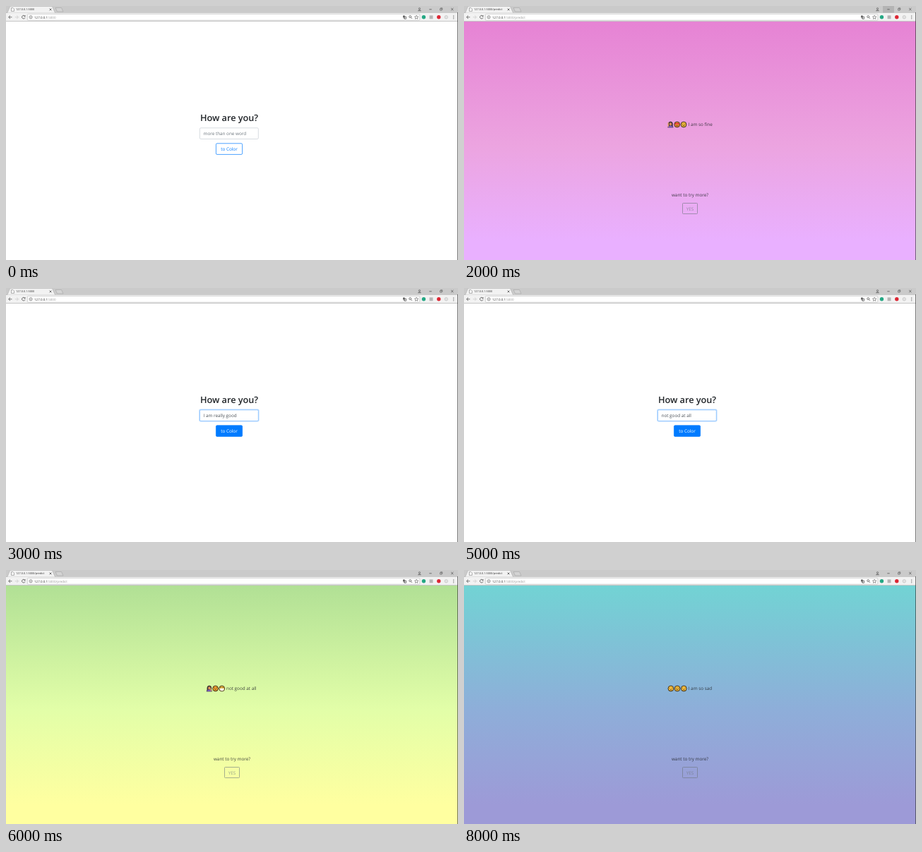
Recreate the animation shown at these times as an HTML page. Size 640 by 360 pixels, loop 9000 ms.

```html
<!DOCTYPE html>
<html lang="en">
<head>
<meta charset="utf-8">
<title>Mood to color</title>
<style>
  html, body { margin: 0; width: 100%; height: 100%; overflow: hidden; background: #fff; }
  svg { display: block; width: 100vw; height: 100vh; }
  text { font-family: "Open Sans", "Noto Sans", sans-serif; font-size: 6.35px; text-rendering: geometricPrecision; white-space: pre; }
  .line { fill: none; stroke: #555; stroke-width: .8; }
  .mid { text-anchor: middle; }
  .ink { fill: #212529; }
  .face { fill: #fdc23c; stroke: #29231f; stroke-width: .9; }
  .mark { fill: none; stroke: #3a2a18; stroke-width: .8; stroke-linecap: round; }
</style>
</head>
<body>
<svg viewBox="0 0 640 360" preserveAspectRatio="none">
  <defs>
    <linearGradient id="sky" x1="0" y1="0" x2="0" y2="1">
      <stop offset="0"/><stop offset=".52"/><stop offset=".92"/>
    </linearGradient>
  </defs>

  <rect width="640" height="360" fill="#fff"/>

  <g id="form">
    <text class="mid ink" x="316" y="163.3" style="font-size:12.7px;font-weight:600">How are you?</text>
    <rect id="glow" x="273.2" y="171.6" width="85.3" height="18" rx="2" fill="#bfdeff"/>
    <rect id="field" x="274.4" y="172.8" width="82.9" height="15.7" rx="1.5" fill="#fff" stroke-width=".8"/>
    <text id="entry" x="279.5" y="183.2"></text>
    <rect id="send" x="297.4" y="194.8" width="37.2" height="15.6" rx="1.5" stroke="#007bff" stroke-width=".7"/>
    <text id="sendText" class="mid" x="316" y="205.2">to Color</text>
  </g>

  <g id="result">
    <rect y="22" width="640" height="338" fill="url(#sky)"/>
    <g id="emoji"></g>
    <text id="answer" class="ink" y="170.3" opacity=".85"></text>
    <text class="mid ink" x="320" y="270.3" opacity=".85">want to try more?</text>
    <g opacity=".65">
      <rect x="309.5" y="279.5" width="21" height="15" rx=".8" fill="none" stroke="#6c757d" stroke-width=".9"/>
      <text class="mid" x="320" y="289.7" fill="#6c757d">YES</text>
    </g>
  </g>

  <g id="browser">
    <rect width="640" height="10" fill="#cacaca"/>
    <rect id="hover" x="593" width="16" height="9.5" fill="#b4b4b4"/>
    <path d="M0 10 L2 9.6 L5.5 1.2 Q6 .5 7 .5 H64 Q65.3 .5 65.8 1.4 L69.3 9.4 L70 10Z" fill="#f2f2f2" stroke="#aaa" stroke-width=".5"/>
    <path d="M70 2.5 H78.5 L81 8 H72.5Z" fill="#d3d3d3" stroke="#a5a5a5" stroke-width=".6"/>
    <rect y="10" width="640" height="12" fill="#f2f2f2"/>
    <path d="M0 21.6 H640" stroke="#b8b8b8" stroke-width=".8"/>
    <rect x="30.4" y="11.4" width="555.4" height="8.8" rx=".7" fill="#fff" stroke="#c4c4c4" stroke-width=".7"/>
    <path d="M7.5 2.7 H10 L11.4 4.1 V7.4 H7.5Z" fill="#fff" stroke="#777" stroke-width=".6"/>
    <text id="tab" x="14" y="6.4" fill="#333" style="font-size:3.88px"></text>
    <path class="line" d="M61.6 3.6 L64.4 6.4 M64.4 3.6 L61.6 6.4"/>
    <path class="line" d="M8.4 15.8 H3.8 M6 13.5 L3.7 15.8 L6 18.1"/>
    <path class="line" d="M12.8 15.8 H17.4 M15.2 13.5 L17.5 15.8 L15.2 18.1" style="stroke:#ccc"/>
    <path class="line" d="M26.7 14.3 A2.3 2.3 0 1 0 27 16.5 M27.1 13.2 V14.8 H25.4"/>
    <circle class="line" cx="35.1" cy="15.8" r="2.1" style="stroke-width:.6"/>
    <path class="line" d="M35.1 15.3 V17 M35.1 14.2 V14.7" style="stroke-width:.6"/>
    <text x="40" y="17.5" fill="#333" style="font-size:4.5px">127.0.0.1<tspan id="path" fill="#999"></tspan></text>

    <rect x="562" y="13.5" width="2.8" height="3" fill="#666"/>
    <path class="line" d="M564.4 15.2 H566.6 V18.2 H564.2Z M563 17 L564.2 18.2"/>
    <circle class="line" cx="572.3" cy="15.2" r="1.5"/>
    <path class="line" d="M573.4 16.3 L575.1 18"/>
    <path class="line" d="M581.2 13.2 l.8 1.7 1.9 .2 -1.4 1.3 .4 1.9 -1.7 -.9 -1.7 .9 .4 -1.9 -1.4 -1.3 1.9 -.2Z" style="stroke-width:.6"/>
    <circle cx="591.5" cy="15.8" r="2.7" fill="#25a884"/>
    <rect x="599.6" y="13.4" width="4.9" height="4.9" fill="#b5b5b5"/>
    <circle cx="612.8" cy="15.8" r="2.7" fill="#dc2734"/>
    <circle cx="623.3" cy="15.8" r="2.2" fill="#e4e4e4" stroke="#b5b5b5" stroke-width=".6"/>
    <g fill="#555"><circle cx="633.8" cy="13.8" r=".6"/><circle cx="633.8" cy="15.8" r=".6"/><circle cx="633.8" cy="17.8" r=".6"/></g>

    <circle class="line" cx="585.5" cy="3.7" r="1.1" style="stroke-width:.7"/>
    <path class="line" d="M583.6 6.7 Q585.5 4.3 587.4 6.7Z" style="stroke-width:.7"/>
    <path class="line" d="M599.3 4.8 H602.7"/>
    <path class="line" d="M614.6 3.7 H617 V6.1 H614.6Z M615.4 3.4 V2.8 H617.8 V5.3 H617.3" style="stroke-width:.6"/>
    <path class="line" d="M630.2 3 L633.4 6.2 M633.4 3 L630.2 6.2"/>
  </g>
  <rect x="639" y="9" width="1" height="351" fill="#333" opacity=".65"/>
</svg>
<script>
const $ = id => document.getElementById(id);
const set = (id, attrs) => {
  for (const key in attrs) $(id).setAttribute(key, attrs[key]);
};
const show = (id, on) => set(id, { visibility: on ? "visible" : "hidden" });

// Each emoji is drawn around its own centre.
const head = '<circle class="face" r="3.9"/>';
const mark = d => `<path class="mark" d="${d}"/>`;
const woman = arm => `
  <path d="M-2.9 3.3 V-1 Q-2.7 -4 0 -4 Q2.9 -4 2.9 -1 V3.3Z" fill="#40323b" stroke="#29231f" stroke-width=".6"/>
  <path d="M-3.8 4.1 Q-3.4 1.3 0 1.3 Q3.4 1.3 3.8 4.1Z" fill="#8562c8" stroke="#38304a" stroke-width=".6"/>
  <ellipse cy="-.7" rx="1.7" ry="2.1" fill="#d98b55"/>
  <path d="${arm}" fill="none" stroke="#e2a05d" stroke-width="1.3" stroke-linecap="round"/>`;
const heart = x => `<path d="M${x} .3 l-1.5 -1.5 q0 -1.5 1.5 -.6 q1.5 -.9 1.5 .6Z" fill="#d9233f"/>`;

const art = {
  raise: woman("M-3 2.5 L-3.3 -2.4"),
  palm: woman("M2.8 2.9 L.7 -1.1"),
  love: '<circle class="face" r="3.9" style="fill:#f5912f"/>' + heart(-1.5) + heart(1.5) + mark("M-1.4 1.5 Q0 2.7 1.4 1.5"),
  smile: head + mark("M-1.9 -.8 h.9 M1 -.8 h.9 M-1.6 1.2 Q0 2.5 1.6 1.2"),
  sleepy: head + mark("M-2.1 -.6 q.6 .5 1.2 0 M.9 -.6 q.6 .5 1.2 0 M-1.2 1.6 H1.2"),
  sad: head + mark("M-1.6 -.8 v.3 M1.6 -.8 v.3 M-1.4 2 Q0 .8 1.4 2"),
  angry: '<circle class="face" r="3.9" style="fill:#f7a52e"/>' + mark("M-2 -1.2 L-.9 -.5 M2 -1.2 L.9 -.5 M-1.3 1.8 Q0 .9 1.3 1.8"),
  cool: head + '<path d="M-3.5 -1.6 H3.5 L2.7 .5 H.8 L0 -.7 L-.8 .5 H-2.7Z" fill="#222"/>' + mark("M-1.3 1.9 Q0 2.6 1.4 1.6"),
  mask: head + '<path d="M-3.3 .1 Q0 -1 3.3 .1 L2.2 2.8 Q0 3.8 -2.2 2.8Z" fill="#f4f4ee"/>' + mark("M-1.8 -1.4 h.8 M1 -1.4 h.8"),
  thumb: '<path class="face" d="M-3.6 -.2 H-1.6 L.4 -3.6 Q2 -3.7 1.2 -.8 H3 Q3.8 -.5 3.5 .7 L2.8 3 Q2.5 3.6 1.6 3.6 H-3.6Z"/>'
};

const moods = [
  { say: "I am so fine", x: 317.5, sky: ["#e683d4", "#eca4e0", "#e9b0ff"],
    icons: [["raise", 292.4], ["love", 301.7], ["sleepy", 311]] },
  { say: "I am really good", x: 309.8, sky: ["#e78bbe", "#edafd6", "#e6adff"],
    icons: [["smile", 286.2], ["thumb", 294.7], ["cool", 303.8]] },
  { say: "not good at all", x: 312, sky: ["#b1e095", "#e2fea8", "#ffffa0"],
    icons: [["palm", 287.8], ["angry", 296.6], ["mask", 305.7]] },
  { say: "I am so sad", x: 317.7, sky: ["#72d3d4", "#8eaed9", "#9d9ad7"],
    icons: [["sad", 292.9], ["sleepy", 302], ["sad", 311.3]] }
];
const stops = document.querySelectorAll("#sky stop");
const STEP = 1000, STEPS = 9;

function drawForm(mood) {
  const filled = Boolean(mood);
  $("entry").textContent = filled ? mood.say : "more than one word";
  set("entry", { fill: filled ? "#495057" : "#6c757d" });
  show("glow", filled);
  set("field", { stroke: filled ? "#80bdff" : "#ced4da" });
  set("send", { fill: filled ? "#007bff" : "#fff" });
  set("sendText", { fill: filled ? "#fff" : "#007bff" });
}

function drawResult(mood) {
  stops.forEach((stop, i) => stop.setAttribute("stop-color", mood.sky[i]));
  $("answer").textContent = mood.say;
  set("answer", { x: mood.x });
  $("emoji").innerHTML = mood.icons
    .map(([name, x]) => `<g transform="translate(${x} 168)">${art[name]}</g>`).join("");
}

// Step 0 is the empty form; then each mood is typed and answered in turn.
function draw(step) {
  const mood = step ? moods[(step - 1) >> 1] : null;
  const answered = step > 0 && step % 2 === 0;
  const path = ":5000" + (answered ? "/predict" : "");
  $("tab").textContent = "127.0.0.1" + path;
  $("path").textContent = path;
  show("hover", step === 1 || step === 2);
  show("form", !answered);
  show("glow", false);
  show("result", answered);
  if (answered) drawResult(mood);
  else drawForm(mood);
}

let shown = 0;
const start = performance.now();
function tick() {
  const step = Math.floor((performance.now() - start) / STEP) % STEPS;
  if (step !== shown) draw(shown = step);
  requestAnimationFrame(tick);
}
draw(0);
requestAnimationFrame(tick);
</script>
</body>
</html>
```
